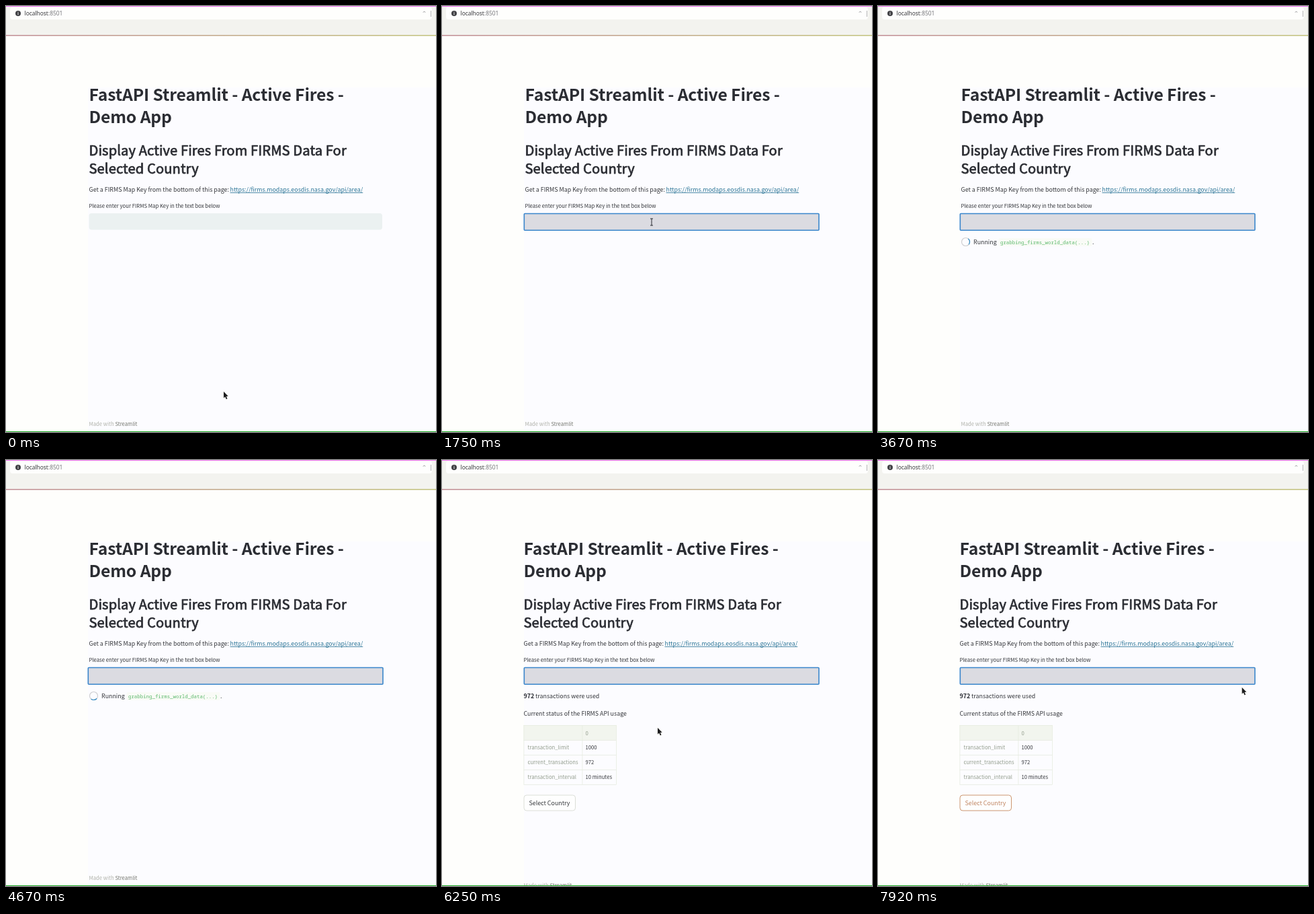
These frames come from a looping animation (640 px wide and 633 px high, 8000 ms). An HTML page with a canvas:

```html
<!DOCTYPE html>
<html lang="en">
<head>
<meta charset="utf-8">
<title>Active Fires Demo</title>
<style>
html, body { margin: 0; width: 100%; height: 100%; overflow: hidden; background: #fcfcff; }
canvas { display: block; width: 640px; height: 633px; }
</style>
</head>
<body>
<canvas id="stage" width="640" height="633"></canvas>
<script>
const ctx = document.getElementById('stage').getContext('2d');
const LOOP = 8000, STEP = 1000 / 12;
const SANS = '"Noto Sans CJK JP", "Noto Sans CJK SC", "Noto Sans CJK", "Open Sans", sans-serif';
const MONO = '"Noto Sans Mono", "DejaVu Sans Mono", monospace';
const UI = '"Noto Sans", "Open Sans", sans-serif';
const CJK_LATIN = 1.117; // Latin letters in the CJK face are drawn this much larger
const INK = '#2b2d33', BODY = '#34363a', MUTED = '#929c8c';
const LINE = '#e6ebe0', LINK = '#2a7496';

// Moments of the session in ms
const FOCUS = 1330, RUN = 3500, RESULT = 5080, TABLE = 5750, HOVER = 6900;

// Pointer path: time, x, y
const HIDE = 1830, SHOW = 5250;
const path = [
  [0, 324, 573], [250, 323, 566], [650, 317, 420], [1000, 314, 336], [1250, 312, 321], [1830, 312, 321],
  [5250, 396, 338], [5500, 374, 351], [6250, 321, 398], [6700, 215, 490], [6920, 168, 510],
  [7250, 166, 510], [7500, 260, 470], [7920, 544, 337], [8000, 552, 334]
];

function rect(x, y, w, h, color) {
  ctx.fillStyle = color;
  ctx.fillRect(x, y, w, h);
}

function round(x, y, w, h, r, fill, stroke, width = 1) {
  ctx.beginPath();
  ctx.roundRect(x, y, w, h, r);
  if (fill) { ctx.fillStyle = fill; ctx.fill(); }
  if (stroke) { ctx.strokeStyle = stroke; ctx.lineWidth = width; ctx.stroke(); }
}

function disc(x, y, r, color) {
  ctx.beginPath();
  ctx.arc(x, y, r, 0, Math.PI * 2);
  ctx.fillStyle = color;
  ctx.fill();
}

function write(str, x, y, font, color, spacing = 0) {
  ctx.font = font;
  ctx.letterSpacing = spacing + 'px';
  ctx.fillStyle = color;
  ctx.fillText(str, x, y);
}

function text(str, x, y, size, color = BODY, weight = 400, spacing = 0) {
  write(str, x, y, `${weight} ${size / CJK_LATIN}px ${SANS}`, color, spacing);
}

// Semibold: regular letters thickened by a thin outline
function semibold(str, x, y, size, spacing, extra) {
  text(str, x, y, size, INK, 400, spacing);
  ctx.strokeStyle = INK;
  ctx.lineWidth = extra;
  ctx.lineJoin = 'round';
  ctx.strokeText(str, x, y);
}

function drawBrowser() {
  rect(0, 0, 640, 633, '#fefefc');
  rect(122, 121, 518, 512, '#fcfcff');
  rect(0, 1, 640, 43, '#f3f3ef');
  round(6, 1.5, 628, 18.5, 4, '#fefefd');
  rect(0, 0, 640, 1, '#ee70ee');
  const glow = ctx.createLinearGradient(0, 0, 640, 0);
  glow.addColorStop(0, '#c08c94');
  glow.addColorStop(1, '#c2c27c');
  rect(0, 43, 640, 1.5, glow);
  disc(18, 11, 4, '#404044');
  rect(17.5, 8.7, 1, 1, '#f4f4f4');
  rect(17.5, 10.4, 1, 2.8, '#f4f4f4');
  write('localhost', 27.5, 14, `8.4px ${UI}`, '#38383c');
  const w = ctx.measureText('localhost').width;
  write(':8501', 27.5 + w, 14, `8.4px ${UI}`, '#75757a');
  ctx.strokeStyle = '#848488';
  ctx.lineWidth = 1;
  ctx.beginPath();
  ctx.moveTo(621, 9.5);
  ctx.lineTo(622.5, 8);
  ctx.lineTo(624, 9.5);
  ctx.stroke();
  rect(632, 7, 1, 9, '#b4b4b4');
}

function drawIntro(x) {
  text('FastAPI Streamlit - Active Fires -', x, 141, 27.6, INK, 700, -0.14);
  text('Demo App', x, 174, 27.6, INK, 700, -0.14);
  semibold('Display Active Fires From FIRMS Data For', x, 222, 22.5, 0.11, 0.75);
  semibold('Selected Country', x, 249, 22.5, 0.11, 0.75);
  text('Get a FIRMS Map Key from the bottom of this page:', x, 275.5, 9.95);
  const url = 'https://firms.modaps.eosdis.nasa.gov/api/area/';
  text(url, x + 210, 275.5, 9.95, LINK);
  rect(x + 210, 277, ctx.measureText(url).width, 0.8, LINK);
  text('Please enter your FIRMS Map Key in the text box below', x, 300.2, 8.65);
}

function drawInput(x, focused) {
  if (focused) round(122.3, 308.5, 438.7, 24.8, 1, '#dbdbe1', '#3a86cc', 1.6);
  else round(x, 308, 560 - x, 24.5, 4, '#ebf1f1');
}

function drawRunning(x, t) {
  const a = (t - RUN) / 800 * Math.PI * 2 - 2.2;
  ctx.lineWidth = 1.2;
  ctx.strokeStyle = '#cfcfd2';
  ctx.beginPath();
  ctx.arc(x + 7, 350.5, 6, 0, Math.PI * 2);
  ctx.stroke();
  ctx.strokeStyle = '#2f8ac4';
  ctx.beginPath();
  ctx.arc(x + 7, 350.5, 6, a, a + Math.PI / 2);
  ctx.stroke();
  text('Running', x + 18.5, 353.8, 9.9);
  round(x + 56, 345, 139, 12, 2, '#f9fbf6');
  write('grabbing_firms_world_data(...)', x + 58.5, 353.8, `7.4px ${MONO}`, '#5cb86c');
  text('.', x + 195.5, 353.8, 9.9);
}

function drawTable(x, loaded) {
  const head = '#f2f5ee';
  if (!loaded) {
    rect(x, 394, 6, 23, head);
    rect(x, 394, 134, 0.7, LINE);
    rect(x, 482, 134, 0.7, LINE);
    return;
  }
  rect(x, 394, 138, 22.5, head);
  for (let i = 0; i < 5; i++) rect(x, 394 + i * 22, 138, 0.8, LINE);
  for (const dx of [0, 87, 137.5]) rect(x + dx, 394, 0.8, 88, LINE);
  text('0', x + 92, 408.5, 8.6, MUTED);
  const rows = [['transaction_limit', '1000'], ['current_transactions', '972'], ['transaction_interval', '10 minutes']];
  rows.forEach(([name, value], i) => {
    const y = 430.3 + i * 21.7;
    text(name, x + 6, y, 8.6, MUTED);
    text(value, x + 92, y, 8.6);
  });
}

function drawButton(x, hot) {
  round(x + 0.5, 498, 76.5, 23, 4, '#fefefe', hot ? '#cc9670' : '#dcdfd8');
  text('Select Country', x + 8, 512.8, 9.9, hot ? '#c08460' : BODY);
}

function drawResult(x, t) {
  text('972', x, 353.8, 9.9, INK, 700);
  text('transactions were used', x + 17.5, 353.8, 9.9);
  text('Current status of the FIRMS API usage', x, 380, 9.9);
  drawTable(x, t >= TABLE);
  drawButton(x, t >= HOVER);
}

function drawFooter(x, y) {
  text('Made with ', x, y, 8.6, '#b0b2aa');
  const w = ctx.measureText('Made with ').width;
  text('Streamlit', x + w, y, 8.6, '#74766e');
}

function pointerAt(t) {
  const i = Math.max(1, path.findIndex(p => p[0] > t));
  const [t0, x0, y0] = path[i - 1], [t1, x1, y1] = path[i];
  const k = (t - t0) / (t1 - t0);
  return [x0 + (x1 - x0) * k, y0 + (y1 - y0) * k];
}

function drawPointer(t) {
  if (t >= HIDE && t < SHOW) return;
  const [x, y] = pointerAt(t);
  const overInput = x > 123 && x < 560 && y > 308 && y < 333;
  ctx.save();
  ctx.translate(x, y);
  if (overInput) {
    rect(-0.5, -5, 1, 10, INK);
    rect(-2, -5.5, 4, 1, INK);
    rect(-2, 4.5, 4, 1, INK);
  } else {
    const shape = [[0, 0], [0, 9.4], [2.1, 7.5], [3.8, 11.2], [5.4, 10.4], [3.8, 6.9], [6.6, 6.7]];
    ctx.beginPath();
    shape.forEach(([px, py]) => ctx.lineTo(px, py));
    ctx.closePath();
    ctx.lineWidth = 1.2;
    ctx.strokeStyle = '#f4f4f0';
    ctx.stroke();
    ctx.fillStyle = '#1c1c1e';
    ctx.fill();
  }
  ctx.restore();
}

function draw(now) {
  const t = Math.floor((now % LOOP + 4) / STEP) % 96 * STEP;
  const done = t >= RESULT;
  const x = done ? 121.5 : 123.5;
  drawBrowser();
  drawIntro(x);
  drawInput(x, t >= FOCUS);
  if (done) drawResult(x, t);
  else if (t >= RUN) drawRunning(x, t);
  drawFooter(x, done ? 635 : 624.3);
  rect(0, 632, 640, 1, '#1fae28');
  drawPointer(t);
}

let start = null;
function tick(now) {
  if (start === null) start = now;
  draw(now - start);
  requestAnimationFrame(tick);
}
requestAnimationFrame(tick);
</script>
</body>
</html>
```
